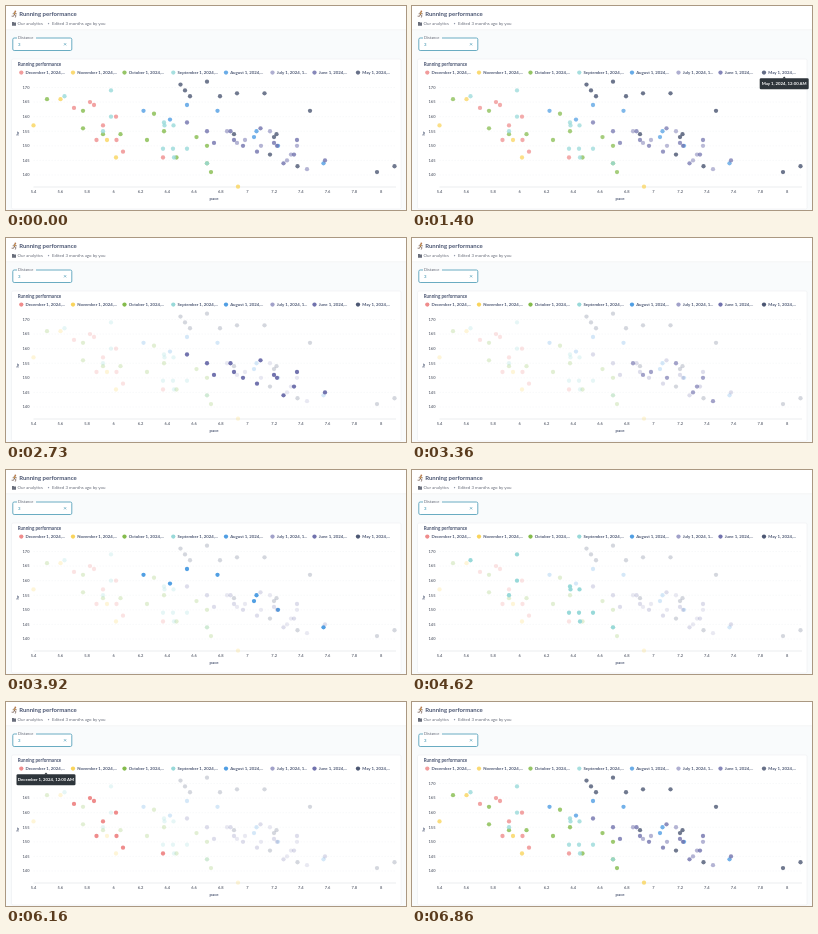
These frames come from a looping animation (400x204 px, 7560 ms). An HTML page:

```html
<!DOCTYPE html>
<html lang="en">
<head>
<meta charset="utf-8">
<title>Running performance</title>
<style>
  html, body { margin: 0; width: 100%; height: 100%; overflow: hidden; background: #fff; }
  svg { display: block; width: 100vw; height: 100vh; font-family: Lato, sans-serif; }
</style>
</head>
<body>
<svg id="stage" viewBox="0 0 400 204"></svg>
<script>
const LOOP = 7560, FADE = 260;
const NORMAL = 0.8, BLURRED = 0.24, ACTIVE = 1;
const stage = document.getElementById('stage');

// Points are alternating stage x and heart rate.
const series = [
  { label: 'December 1, 2024,...', x: 15.3, color: '#ef8c8c', points: [
    68, 163, 84, 165, 88, 164, 97, 157, 110, 160, 110.5, 152, 90.5, 152, 117, 148, 157, 146] },
  { label: 'November 1, 2024,...', x: 67, color: '#f9d45c', points: [
    27.5, 157, 54.5, 166, 101, 152, 110, 146, 232, 136] },
  { label: 'October 1, 2024,...', x: 118.5, color: '#84bb4c', points: [
    41, 166, 77, 162, 77, 156, 97, 154, 114.5, 154, 141, 152, 148, 161, 158, 155, 170.5, 146,
    190.5, 153, 201, 150, 201, 144, 205, 141] },
  { label: 'September 1, 2024,...', x: 167.3, color: '#98d9d9', points: [
    58.5, 167, 97, 155, 105, 169, 105, 160, 158, 158, 158.5, 157, 167.5, 157, 157, 149,
    167, 149, 168, 146, 181, 149, 201, 144] },
  { label: 'August 1, 2024,...', x: 220, color: '#509ee3', points: [
    137.5, 162, 164, 159, 181, 164, 211.5, 162, 248, 153, 250.5, 155, 272, 150, 317.5, 144] },
  { label: 'July 1, 2024, 1...', x: 266.5, color: '#a1a1c9', points: [
    221, 155, 231, 151, 239, 152, 255, 150, 264, 155, 281, 145, 285, 147, 291, 150, 301, 142] },
  { label: 'June 1, 2024,...', x: 308.5, color: '#7172ad', points: [
    181, 158, 201, 155, 208, 151, 224.5, 155, 228, 152, 237, 150, 251, 148, 254.5, 156,
    268, 151, 271, 150, 277.5, 144, 288, 147, 291, 152, 319, 145] },
  { label: 'May 1, 2024,...', x: 352, color: '#4c5773', points: [
    174.5, 171, 179, 169, 184, 167, 201, 172, 214, 167, 231, 168, 258.5, 168, 304, 162,
    228, 154, 268, 153, 270.5, 154, 264, 147, 291.5, 143, 371, 141, 388.5, 143] }
];

// Start time and hovered series; -1 is no hover.
const hovers = [
  [1390, 7], [1990, 6], [2730, 5], [3360, 4], [3920, 3],
  [4650, 2], [5250, -1], [5310, 1], [5950, 0], [6640, -1]
];

const yOf = hr => 169 - (hr - 140) * 2.917;
const xOf = pace => 27.5 + (pace - 5.4) * 133.7;

function add(tag, attrs, parent = stage) {
  const el = document.createElementNS('http://www.w3.org/2000/svg', tag);
  for (const key in attrs) el.setAttribute(key, attrs[key]);
  parent.appendChild(el);
  return el;
}

function text(str, x, y, size, attrs, parent) {
  const el = add('text', { x, y, 'font-size': size, fill: '#4c5773', ...attrs }, parent);
  el.textContent = str;
  return el;
}

const line = (d, stroke, width, attrs) =>
  add('path', { d, stroke, 'stroke-width': width, fill: 'none', ...attrs });
const bold = { 'font-weight': 700 };
const centered = { ...bold, 'text-anchor': 'middle' };

function drawHeader() {
  add('rect', { width: 400, height: 204, fill: '#f9fbfc' });
  add('rect', { width: 400, height: 23.5, fill: '#fff' });
  line('M0 23.7H400', '#eeecec', 0.4);
  add('circle', { cx: 9.3, cy: 5.4, r: 0.9, fill: '#b97a4f' });
  line('M9 6.6L8.3 8.6', '#e8a33d', 1.5);
  line('M8.3 8.6L10 9.6L9.4 11.2M8.2 8.6L7.5 10.3L6 10.2M7 7.5L8.6 6.7L10.5 7.8',
    '#6a5148', 0.7, { 'stroke-linecap': 'round' });
  text('Running performance', 13.2, 10, 6, bold);
  add('path', { d: 'M6 16h1.6l.5.6h1.9v3.2H6z', fill: '#696e7b' });
  text('Our analytics', 11.5, 19.4, 4.4, { fill: '#696e7b' });
  text('•', 41.5, 19.2, 3.6, { fill: '#949aab' });
  text('Edited 3 months ago by you', 46, 19.4, 4.4, { fill: '#696e7b' });
}

function drawFilter() {
  add('rect', { x: 6.8, y: 32, width: 59, height: 12.5, rx: 1.4, fill: '#fff',
    stroke: '#5aa3bb', 'stroke-width': 0.9 });
  add('rect', { x: 11, y: 30, width: 19, height: 3, fill: '#f9fbfc' });
  text('Distance', 12, 32.8, 4, { fill: '#696e7b' });
  text('3', 12, 40.2, 4.3, { ...bold, fill: '#5aa3bb' });
  line('M58 37.2l2.2 2.2m0-2.2l-2.2 2.2', '#5aa3bb', 0.7);
}

function drawAxes() {
  add('rect', { x: 5.5, y: 53, width: 389.5, height: 150, rx: 1.5, fill: '#fff',
    stroke: '#e9ebee', 'stroke-width': 0.5 });
  text('Running performance', 11.7, 60.2, 4.55, bold);
  const label = { ...bold, fill: '#696e7b' };
  for (let hr = 140; hr <= 170; hr += 5) {
    line(`M27.5 ${yOf(hr)}H390`, '#eef0f2', 0.4, { 'stroke-dasharray': '1.5 1.5' });
    text(hr, 23.5, yOf(hr) + 1.4, 4, { ...label, 'text-anchor': 'end' });
  }
  line('M27.5 181H390', '#d5d8dd', 0.5);
  for (let i = 0; i < 14; i++) {
    const pace = (54 + i * 2) / 10;
    text(pace, xOf(pace), 187, 4, { ...centered, fill: '#696e7b' });
  }
  text('pace', 208, 194.3, 4.3, centered);
  text('hr', 0, 0, 4.3, { ...centered, transform: 'translate(13.3 127.5) rotate(-90)' });
}

function drawSeries(s) {
  const dot = (cx, cy, parent) => add('circle', { cx, cy, r: 2.15 }, parent);
  s.group = add('g', { fill: s.color });
  for (let i = 0; i < s.points.length; i += 2) dot(s.points[i], yOf(s.points[i + 1]), s.group);
  s.key = add('g', { fill: s.color });
  dot(s.x, 66.6, s.key);
  text(s.label, s.x + 4.2, 68.1, 4.3, bold);
}

function tooltip(str, x, width, top, from, to) {
  const el = add('g', {});
  const mid = x + width / 2;
  add('rect', { x, y: top, width, height: 11, rx: 1.3, fill: '#2e353b' }, el);
  add('path', { d: `M${mid - 1.8} ${top + 0.1}l1.8 -1.9l1.8 1.9z`, fill: '#2e353b' }, el);
  text(str, mid, top + 7, 4.3, { ...centered, fill: '#fff' }, el);
  return { el, from, to };
}

drawHeader();
drawFilter();
drawAxes();
series.forEach(drawSeries);
const tooltips = [
  tooltip('May 1, 2024, 12:00 AM', 347.7, 49, 72.3, 1400, 1960),
  tooltip('December 1, 2024, 12:00 AM', 10.5, 59, 72.3, 5950, 6650)
];

// Follows every hover change up to time t, easing out towards each target.
function follow(t, start, target) {
  return hovers.reduce((value, [from, active], i) => {
    if (t < from) return value;
    const end = i + 1 < hovers.length ? hovers[i + 1][0] : LOOP;
    const p = Math.min(1, (Math.min(t, end) - from) / FADE);
    return value + (target(active) - value) * (1 - (1 - p) ** 3);
  }, start);
}

function draw(t) {
  const keyOpacity = follow(t, 0.85, active => active < 0 ? 0.85 : 1);
  series.forEach((s, i) => {
    s.group.setAttribute('fill-opacity', follow(t, NORMAL,
      active => active < 0 ? NORMAL : active === i ? ACTIVE : BLURRED));
    s.key.setAttribute('fill-opacity', keyOpacity);
  });
  for (const { el, from, to } of tooltips)
    el.setAttribute('visibility', t >= from && t < to ? 'visible' : 'hidden');
}

const began = performance.now();
function tick() {
  draw((performance.now() - began) % LOOP);
  requestAnimationFrame(tick);
}
tick();
</script>
</body>
</html>
```
